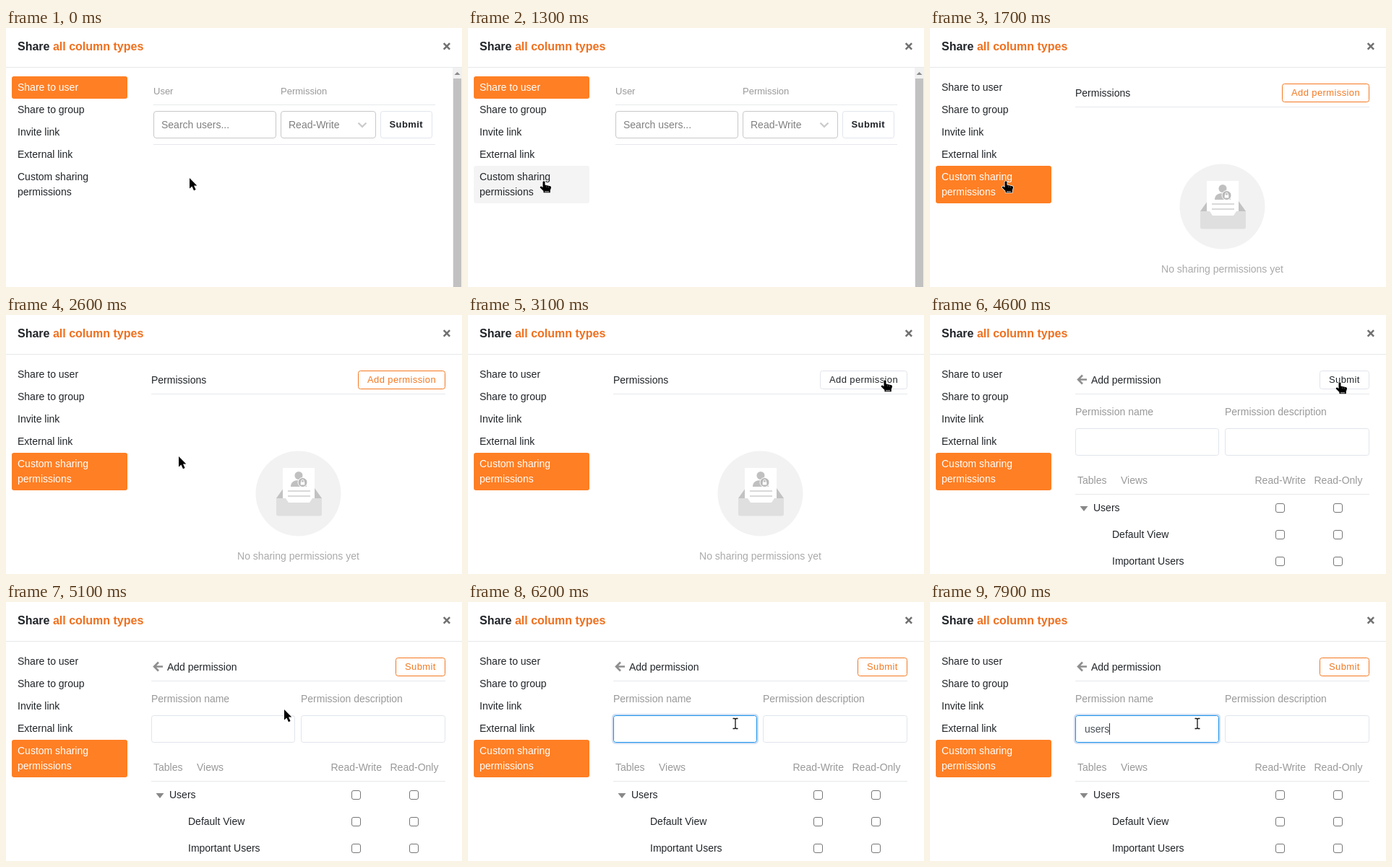
Animation of 631 by 359 pixels, one loop 8000 ms. Source, as an HTML page:

```html
<!DOCTYPE html>
<html lang="en">
<head>
<meta charset="utf-8">
<title>Share dialog</title>
<style>
  html, body { margin: 0; width: 100%; height: 100%; overflow: hidden; background: #fff; }
  svg { display: block; width: 631px; height: 359px; }
  text { font: 14px "Liberation Sans", Arial, sans-serif; fill: #212529; white-space: pre; }
  .title { font-size: 16px; font-weight: bold; }
  .small { font-size: 13px; }
  .btn { font-size: 13px; letter-spacing: .39px; }
  .muted { fill: #999; }
  .hint { fill: #808080; }
  .rule { stroke: #e6e8eb; }
  .box { fill: #fff; stroke: #e0e4eb; }
  .select { fill: #fff; stroke: #c8c8c8; }
  .check { fill: #fff; stroke: #767676; }
</style>
</head>
<body>
<svg viewBox="0 0 631 359" xmlns="http://www.w3.org/2000/svg">
  <rect width="631" height="359" fill="#fff"/>
  <text class="title" x="16" y="31">Share <tspan fill="#f0701e">all column types</tspan></text>
  <path d="M605.7 21.2l8.4 8.4m0-8.4l-8.4 8.4" stroke="#707070" stroke-width="2.5"/>
  <path class="rule" d="M0 54.5H631"/>
  <g id="nav"></g>

  <g id="userView">
    <rect x="618" y="55" width="13" height="304" fill="#f1f1f1"/>
    <rect x="619" y="70" width="11" height="289" fill="#c1c1c1"/>
    <path d="M620.5 65l4-4 4 4z" fill="#8a8a8a"/>
    <text class="small muted" x="204" y="92">User</text>
    <text class="small muted" x="380" y="92">Permission</text>
    <path class="rule" d="M204 106.5H594M204 161.5H594"/>
    <rect class="select" x="204.5" y="115.5" width="169" height="37" rx="3.5"/>
    <rect class="select" x="380.5" y="115.5" width="131" height="37" rx="3.5"/>
    <text class="hint" x="215" y="139">Search users...</text>
    <text class="hint" x="391" y="139">Read-Write</text>
    <path d="M487.5 131.5l5.5 5.3 5.5-5.3" fill="none" stroke="#ccc" stroke-width="2.4"/>
    <rect class="box" x="518.5" y="115.5" width="71" height="37" rx="3"/>
    <text class="btn" x="530.5" y="138" font-weight="bold" style="font-weight:bold">Submit</text>
  </g>

  <g id="listView">
    <text x="201" y="95">Permissions</text>
    <path class="rule" d="M201 109.5H608"/>
    <rect id="addRing" x="486" y="76" width="123" height="28" rx="4" fill="none" stroke="#ff8022" stroke-opacity=".25" stroke-width="2"/>
    <g id="addButton">
      <rect x="487.5" y="77.5" width="120" height="25" rx="3"/>
      <text class="btn" x="500" y="94">Add permission</text>
    </g>
    <circle cx="404.5" cy="247.5" r="59" fill="#f2f2f2"/>
    <path d="M374 254l10-14h43l10 14v8h-63z" fill="#c2c2c2"/>
    <path d="M383 212h44v50h-44z" fill="#fff"/>
    <path d="M390 244h31m-31 7h31" stroke="#d9d9d9" stroke-width="2"/>
    <circle cx="405" cy="222.5" r="5.5" fill="#c0c0c0"/>
    <path d="M394 238c0-6 4-9 11-9s11 3 11 9z" fill="#c0c0c0"/>
    <circle cx="410.5" cy="232" r="6.5" fill="#b8b8b8" stroke="#fff"/>
    <path d="M407.7 231.5h5.6v4h-5.6z" fill="#fff"/>
    <path d="M408.8 232v-2a1.7 1.7 0 0 1 3.4 0v2" fill="none" stroke="#fff"/>
    <path d="M374 254h13l4 6h29l4-6h13v22q0 2.5-2.5 2.5h-58q-2.5 0-2.5-2.5z" fill="#dfdfdf"/>
    <text x="404.5" y="339" text-anchor="middle" fill="#aaa" style="fill:#aaa">No sharing permissions yet</text>
  </g>

  <g id="formView">
    <path d="M217 89.5H205m6-6l-6 6 6 6" fill="none" stroke="#8e8e8e" stroke-width="2.5"/>
    <text x="223" y="95">Add permission</text>
    <g id="submitButton">
      <rect x="539.5" y="77.5" width="68" height="25" rx="3"/>
      <text class="btn" x="552" y="94">Submit</text>
    </g>
    <path class="rule" d="M201 109.5H608M201 248.5H608"/>
    <text class="muted" x="201" y="139">Permission name</text>
    <text class="muted" x="408" y="139">Permission description</text>
    <rect id="nameRing" x="200" y="156" width="201" height="40" rx="4" fill="none" stroke="#467fcf" stroke-width="2"/>
    <rect id="nameBox" class="box" x="201.5" y="157.5" width="198" height="37" rx="3"/>
    <rect class="box" x="408.5" y="157.5" width="199" height="37" rx="3"/>
    <text id="typed" x="214" y="181" style="fill:#495057"></text>
    <rect id="caret" y="168" width="1" height="16" fill="#333"/>
    <text class="muted" x="204" y="234">Tables</text>
    <text class="muted" x="264" y="234">Views</text>
    <text class="muted" x="449.5" y="234">Read-Write</text>
    <text class="muted" x="531.5" y="234">Read-Only</text>
    <path d="M207.5 265h11l-5.500 7z" fill="#888"/>
    <g id="rows"></g>
  </g>

  <g id="cursor" stroke-linejoin="round">
    <path id="arrow" d="M0 0V14.500L3.400 11.400 6 17.200 8.600 16 6 10.400H10.300z" fill="#000" stroke="#fff" stroke-width="1.200" paint-order="stroke"/>
    <g id="hand">
      <path d="M-1.500 1.200Q0-.8 1.500 1.200V5.500L9 7.200Q10.300 7.800 10 9.500L8.800 13V16.300H-.5V14L-5.300 9.200Q-5.700 7.200-3.500 7.400L-1.500 9z" fill="#000" stroke="#fff" stroke-width="1.400" paint-order="stroke"/>
      <path d="M3.700 7V9m2.600-1.400v1.900" stroke="#888" stroke-width=".6"/>
      <path d="M1 14.800h6" stroke="#fff" stroke-width=".8"/>
    </g>
    <path id="beam" d="M-3.500-6.500H-1L0-5.500 1-6.500H3.500M0-5.500V6.500M-3.500 7.500H-1L0 6.500 1 7.500H3.500" fill="none" stroke="#111" stroke-width="1.300"/>
  </g>
</svg>
<script>
const LOOP = 8000, STEP = 100;
const ORANGE = [244, 120, 32], DARK = [33, 37, 41], BORDER = [224, 228, 235], BLUE = [25, 145, 235];
const $ = id => document.getElementById(id);
const show = (id, on) => $(id).style.display = on ? "" : "none";
const ramp = (t, from, to) => Math.min(1, Math.max(0, (t - from) / (to - from)));
const mix = (a, b, k) => `rgb(${a.map((v, i) => Math.round(v + (b[i] - v) * k))})`;
const inside = (x, y, l, top, r, b) => x >= l && x <= r && y >= top && y <= b;

const navItems = [
  { y: 67, lines: ["Share to user"] },
  { y: 98, lines: ["Share to group"] },
  { y: 129, lines: ["Invite link"] },
  { y: 160, lines: ["External link"] },
  { y: 191, lines: ["Custom sharing", "permissions"] }
];
$("nav").innerHTML = navItems.map(({ y, lines }) =>
  `<g><rect x="8" y="${y}" width="160" height="${10 + 21 * lines.length}" rx="3"/>` +
  lines.map((s, i) => `<text x="16" y="${y + 20 + 21 * i}">${s}</text>`).join("") + "</g>").join("");

$("rows").innerHTML = [["Users", 226], ["Default View", 252], ["Important Users", 252]].map(([s, x], i) => {
  const y = 267 + 37 * i;
  const check = cx => `<rect class="check" x="${cx}" y="${y - 5.5}" width="12" height="12" rx="2.5"/>`;
  return `<text x="${x}" y="${y + 5}">${s}</text>${check(478.5)}${check(558.5)}`;
}).join("");

// Pointer hot spot: time, x, y
const track = [
  [400, 254, 208], [500, 246, 210], [800, 190, 219], [1000, 130, 217], [1100, 113, 213],
  [1200, 113, 213], [1300, 105, 212], [2300, 105, 212], [2400, 117, 212], [2700, 300, 188],
  [2900, 490, 129], [3000, 556, 99], [3100, 577, 90], [4500, 577, 90], [4600, 567, 93],
  [4700, 530, 106], [4900, 446, 131], [5100, 385, 149], [5200, 374, 161], [5300, 370, 168]
];
function pointerAt(t) {
  const next = track.findIndex(p => p[0] > t);
  if (next === 0) return track[0].slice(1);
  if (next < 0) return track[track.length - 1].slice(1);
  const a = track[next - 1], b = track[next], k = ramp(t, a[0], b[0]);
  return [a[1] + (b[1] - a[1]) * k, a[2] + (b[2] - a[2]) * k];
}

const keyTimes = [7100, 7200, 7500, 7600, 7900];

function paintButton(id, hover) {
  const [rect, label] = $(id).children;
  rect.setAttribute("fill", "#fff");
  rect.setAttribute("stroke", mix(ORANGE, BORDER, hover));
  label.style.fill = mix(ORANGE, DARK, hover);
}

function render(time) {
  const t = Math.floor(time / STEP) * STEP;
  const view = t < 1700 ? "userView" : t < 3600 ? "listView" : "formView";
  for (const id of ["userView", "listView", "formView"]) show(id, id === view);

  const [x, y] = pointerAt(t);
  const overNav = inside(x, y, 8, 191, 168, 243);
  const overButton = view === "listView" ? inside(x, y, 487, 77, 608, 103)
    : view === "formView" && inside(x, y, 539, 77, 608, 103);
  const overInput = view === "formView" && inside(x, y, 201, 157, 400, 195);
  const shape = overNav || overButton ? "hand" : overInput ? "beam" : "arrow";
  for (const id of ["hand", "beam", "arrow"]) show(id, id === shape);
  $("cursor").setAttribute("transform", `translate(${x} ${y})`);

  const selected = view === "userView" ? 0 : 4;
  [...$("nav").children].forEach((item, i) => {
    const [rect, ...labels] = item.children;
    rect.setAttribute("fill", i === selected ? "#ff7f24" : i === 4 && overNav ? "#f4f4f4" : "none");
    labels.forEach(label => label.style.fill = i === selected ? "#fff" : "#212529");
  });

  paintButton("addButton", ramp(t, 2900, 3100));
  show("addRing", t >= 3500);
  paintButton("submitButton", ramp(t, 3640, 3800) - ramp(t, 4600, 4800));

  const focus = ramp(t, 5500, 5800);
  $("nameBox").style.stroke = mix(BORDER, BLUE, focus);
  $("nameRing").setAttribute("stroke-opacity", .25 * focus);

  $("typed").textContent = "users".slice(0, keyTimes.filter(k => k <= t).length);
  show("caret", t >= 5600 && t < 6200 || t >= 6900);
  const width = $("typed").textContent ? $("typed").getComputedTextLength() : 0;
  $("caret").setAttribute("x", 214 + Math.floor(width));
}

const start = performance.now();
function tick() {
  render((performance.now() - start) % LOOP);
  requestAnimationFrame(tick);
}
tick();
</script>
</body>
</html>
```
